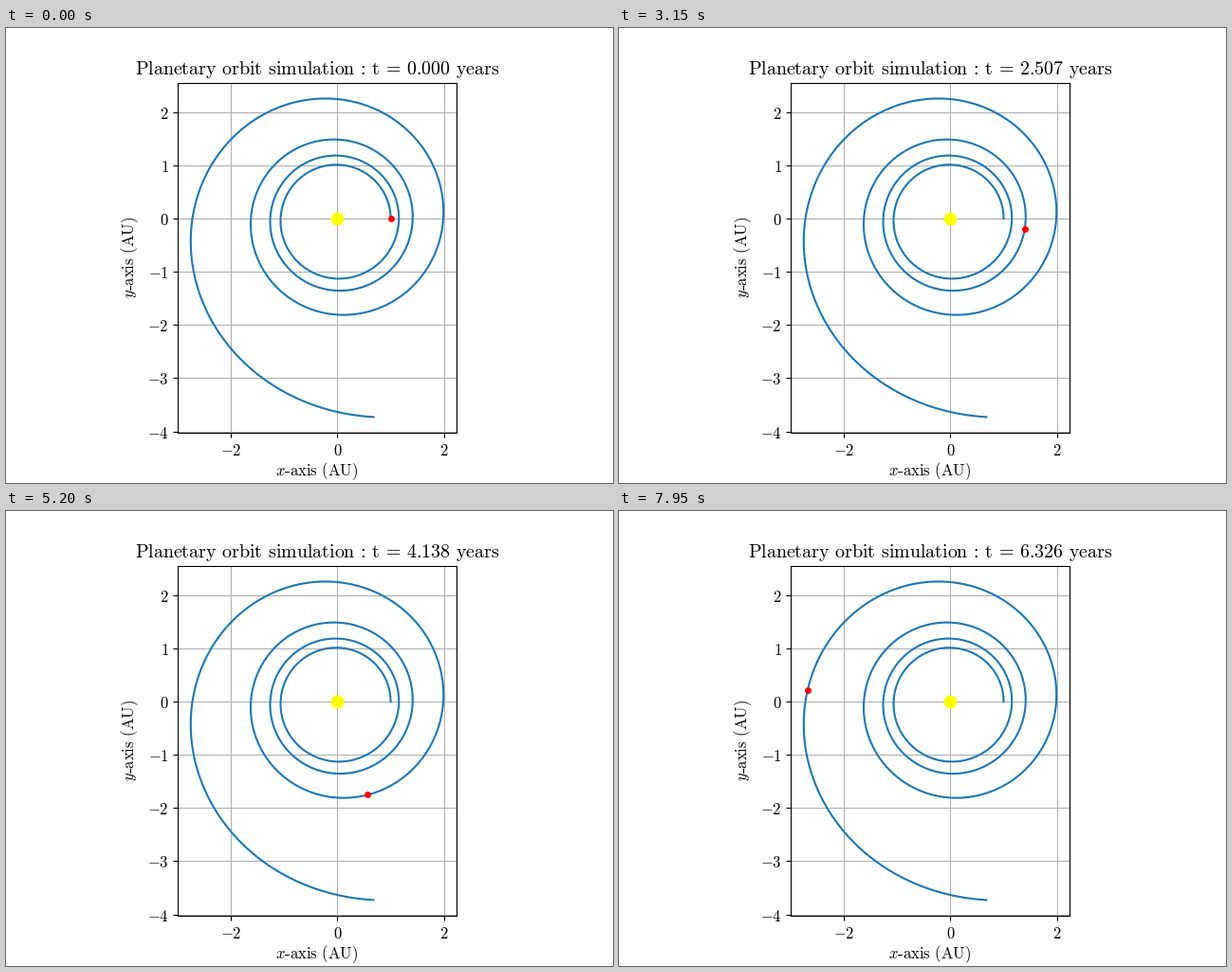
A matplotlib script that plays this animation: 640 by 480 pixels, repeating every 8 s.

```python
import numpy as np
import matplotlib.pyplot as plt
from matplotlib.animation import FuncAnimation
from matplotlib.patches import Rectangle

plt.rcParams["mathtext.fontset"] = "cm"

FRAMES, INTERVAL = 160, 50
STEP = 0.25       # time per frame, with one year = 2 pi
SUB = 10          # integration steps per frame
T_END = 50
THRUST = 0.01     # constant push along the velocity


def deriv(s):
    pos, vel = s[:2], s[2:]
    acc = -pos / np.hypot(*pos) ** 3 + THRUST * vel / np.hypot(*vel)
    return np.concatenate([vel, acc])


def integrate():
    h = STEP / SUB
    path = [np.array([1.0, 0.0, 0.0, 1.0])]
    for _ in range(int(T_END / h)):
        s = path[-1]
        k1 = deriv(s)
        k2 = deriv(s + h / 2 * k1)
        k3 = deriv(s + h / 2 * k2)
        k4 = deriv(s + h * k3)
        path.append(s + h / 6 * (k1 + 2 * k2 + 2 * k3 + k4))
    return np.array(path)[:, :2].T


GAP = r"\hspace{0.38}"
THIN = r"\hspace{0.18}"   # relation signs bring their own space


def roman(text):
    return r"\mathrm{" + text + "}"


def heading(years):
    words = GAP.join(roman(w) for w in ("Planetary", "orbit", "simulation"))
    end = roman(f"{years:.3f}") + GAP + roman("years")
    return f"${words}{THIN}{roman(':')}{THIN}{roman('t')}{THIN}{roman('=')}{THIN}{end}$"


def axis_name(letter):
    # the gap after the letter holds the hyphen
    return f"${letter}{GAP}{roman('axis')}{GAP}{roman('(AU)')}$"


def tick_text(value, _):
    return f"${roman(f'{value:.0f}')}$"


x, y = integrate()

fig, ax = plt.subplots(figsize=(6.4, 4.8), dpi=100)
ax.plot(x, y, color="#1f77b4", lw=1.5)
ax.plot([0], [0], "o", color="yellow", ms=9)
planet, = ax.plot([x[0]], [y[0]], "o", color="red", ms=4)
ax.set_aspect("equal")
ax.grid(True)
ax.set_xticks([-2, 0, 2])
ax.set_yticks(range(-4, 3))
ax.xaxis.set_major_formatter(tick_text)
ax.yaxis.set_major_formatter(tick_text)
ax.tick_params(labelsize=12)
title = ax.set_title(heading(0), fontsize=14.35)


def px(left, top):
    return left / 640, 1 - top / 480


def hyphen(left, bottom, w, h):
    fig.add_artist(Rectangle(px(left, bottom), w / 640, h / 480,
                             fc="black", lw=0))


label = dict(fontsize=12, ha="center", va="baseline", rotation_mode="anchor")
fig.text(*px(328, 472.5), axis_name("x"), **label)
fig.text(*px(135, 242.4), axis_name("y"), rotation=90, **label)
hyphen(294.2, 469.4, 4.4, 1.1)
hyphen(130.8, 276.5, 1.1, 4.4)


def draw(i):
    k = i * SUB
    planet.set_data([x[k]], [y[k]])
    title.set_text(heading(i * STEP / (2 * np.pi)))
    return planet, title


anim = FuncAnimation(fig, draw, frames=FRAMES, interval=INTERVAL,
                     repeat=True, repeat_delay=0, blit=False)
plt.show()
```
